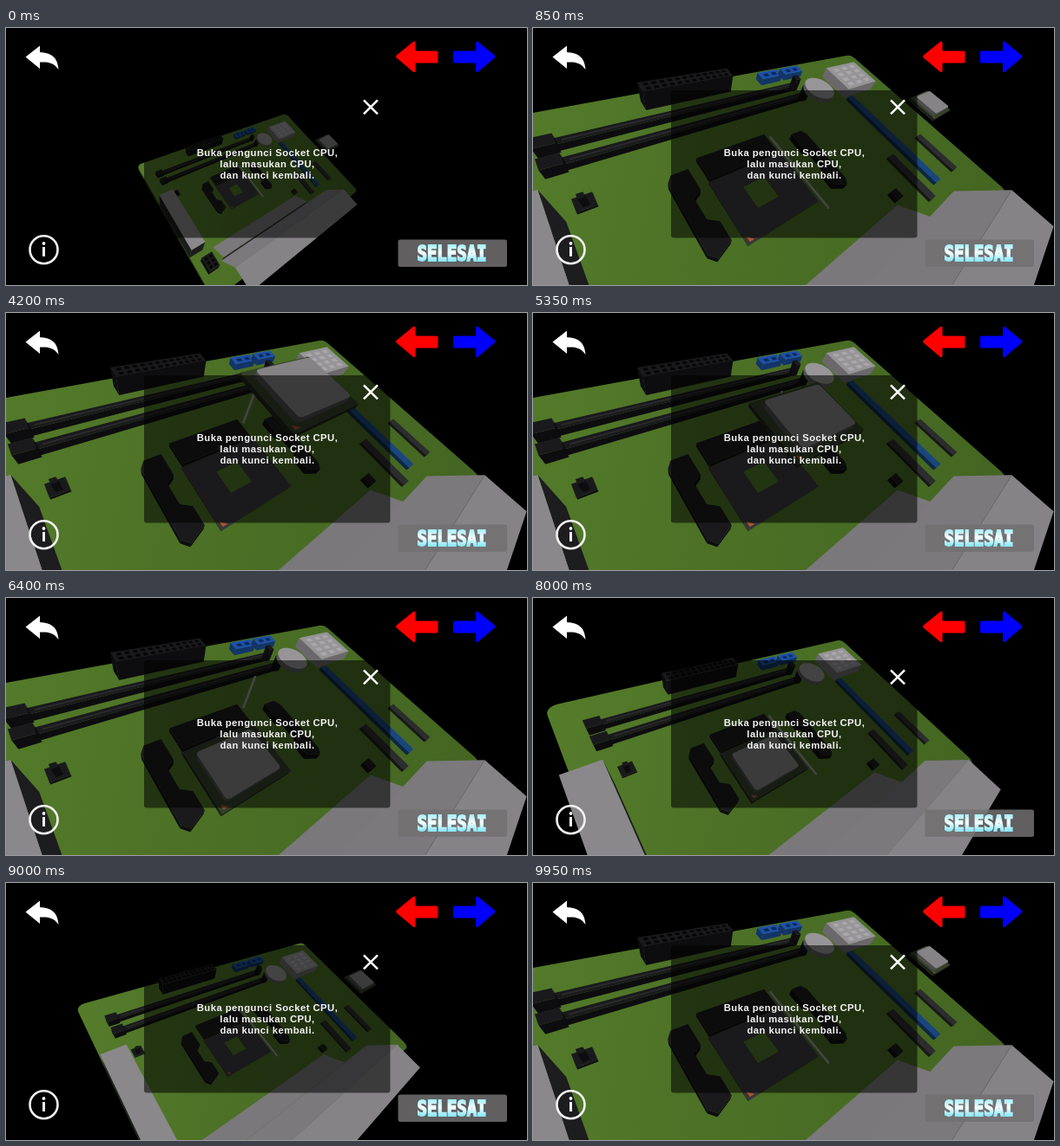
An HTML page with a canvas that plays this animation: 600x297 px, repeating every 10 s.

```html
<!DOCTYPE html>
<html lang="id">
<head>
<meta charset="utf-8">
<title>Socket CPU</title>
<style>
html, body { margin: 0; width: 100%; height: 100%; overflow: hidden; background: #000; }
canvas { display: block; width: 600px; height: 297px; }
</style>
</head>
<body>
<canvas id="stage" width="600" height="297"></canvas>
<script>
const ctx = document.getElementById('stage').getContext('2d');
const LOOP = 10000;

// Board space: u along the far edge, v towards the viewer, z up (homogeneous columns).
const ORIGIN = [-27, 49, 0.45];
const U = [411.3, -16.5, 0.6];
const V = [53.3, 119.5, -0.25];
const Z = [-135, -287, -0.745];
const FOCUS = [266, 186, 1];
let dolly = 0;

const BLACK = ['#1a1a1c', '#0d0d0f'];
const GREY = ['#8a888b', '#1d1c1e'];
const BLUE = ['#1d51a8', '#123469'];

function project([u, v, z = 0]) {
  const [x, y, w] = ORIGIN.map((o, i) => o + u * U[i] + v * V[i] + z * Z[i] + dolly * FOCUS[i]);
  return [x / w, y / w];
}

function trace(points) {
  ctx.beginPath();
  points.forEach(([x, y], i) => i ? ctx.lineTo(x, y) : ctx.moveTo(x, y));
}

function fill(points, color) {
  trace(points);
  ctx.closePath();
  ctx.fillStyle = color;
  ctx.fill();
}

// Draws a face only when it turns clockwise on screen.
function face(corners, color) {
  const p = corners.map(project);
  const area = p.reduce((sum, [x, y], i) => {
    const [nx, ny] = p[(i + 1) % p.length];
    return sum + x * ny - nx * y;
  }, 0);
  if (area > 0) fill(p, color);
}

function slab(outline, bottom, top, [topColor, sideColor]) {
  outline.forEach(([u, v], i) => {
    const [nu, nv] = outline[(i + 1) % outline.length];
    face([[nu, nv, top], [u, v, top], [u, v, bottom], [nu, nv, bottom]], sideColor);
  });
  face(outline.map(([u, v]) => [u, v, top]), topColor);
}

const rect = (u0, v0, u1, v1) => [[u0, v0], [u1, v0], [u1, v1], [u0, v1]];
const box = (u0, v0, u1, v1, h, colors, z = 0) => slab(rect(u0, v0, u1, v1), z, z + h, colors);

function oval(cu, cv, ru, rv, from, to, steps) {
  return Array.from({ length: steps }, (_, i) => {
    const a = from + (to - from) * i / steps;
    return [cu + ru * Math.cos(a), cv + rv * Math.sin(a)];
  });
}

function roundedRect(u0, v0, u1, v1, ru, rv) {
  const q = Math.PI / 2;
  return [[u0 + ru, v0 + rv], [u1 - ru, v0 + rv], [u1 - ru, v1 - rv], [u0 + ru, v1 - rv]]
    .flatMap(([u, v], k) => oval(u, v, ru, rv, (k + 2) * q, (k + 3.2) * q, 6));
}

function pins(u0, v0, u1, v1, z, cols, rows, color = '#060607') {
  const du = (u1 - u0) / cols, dv = (v1 - v0) / rows;
  for (let i = 0; i < cols; i++)
    for (let j = 0; j < rows; j++) {
      const u = u0 + du * i, v = v0 + dv * j;
      face(rect(u + du * .22, v + dv * .2, u + du * .78, v + dv * .8).map(p => [...p, z]), color);
    }
}

function board() {
  const light = ctx.createLinearGradient(...project([0, 0]), ...project([1, 1]));
  light.addColorStop(0, '#557c2b');
  light.addColorStop(1, '#436521');
  slab(roundedRect(0, 0, 1, 1, .022, .035), -.014, 0, [light, '#2c4417']);
}

function ramSlot(v) {
  box(.08, v, .625, v + .022, .018, BLACK);
  face(rect(.09, v + .009, .61, v + .014).map(p => [...p, .018]), '#2c2c2f');
  box(.052, v - .006, .082, v + .028, .026, BLACK);
  box(.614, v - .003, .628, v + .025, .042, BLACK);
}

function bracket(outer, inner, v) {
  const mid = outer + (inner - outer) * .6;
  const end = outer + (inner - outer) * .25;
  const outline = [[outer, v + .02], [end, v], [inner, v], [inner, v + .07], [mid, v + .085], [mid, v + .15],
    [inner, v + .17], [inner, v + .225], [end, v + .245], [outer, v + .225]];
  slab(inner > outer ? outline : outline.reverse(), 0, .02, BLACK);
}

function socket() {
  box(.265, .395, .437, .597, .004, ['#39373b', '#222']);
  face(rect(.318, .45, .368, .525).map(p => [...p, .004]), '#4f7429');
  face([[.27, .575, .005], [.28, .592, .005], [.27, .592, .005]], '#a4572c');
  box(.268, .315, .43, .392, .012, ['#1b1a1d', '#111']);
}

function lever(open) {
  const angle = open * Math.PI / 2, len = .3 - .155 * open;
  const base = project([.443, .33, .006]);
  const tip = project([.445, .33 + len * Math.cos(angle), .006 + len * .69 * Math.sin(angle)]);
  trace([base, tip]);
  ctx.strokeStyle = '#96969a';
  ctx.lineWidth = 2.6 / (1 + dolly);
  ctx.lineCap = 'round';
  ctx.stroke();
}

function cpu([u, v, z, s]) {
  const a = .08 * s, b = .095 * s;
  box(u - a, v - b, u + a, v + b, .01, ['#35412a', '#1d2419'], z);
  const c = a * .8, e = b * .8;
  slab(roundedRect(u - c, v - e, u + c, v + e, c * .12, e * .12), z + .01, z + .022, ['#858386', '#4c4b4e']);
  face([[u - a * .92, v + b * .78, z + .01], [u - a * .78, v + b * .92, z + .01], [u - a * .92, v + b * .92, z + .01]], '#a4572c');
}

// Heat sink running along u: a slope from v0 up to v1, then flat until v2.
function ridgeSink(a, b, v0, v1, v2, h, slope, top) {
  const dark = '#242326';
  face([[a, v2, 0], [a, v2, h], [a, v1, h], [a, v0, 0]], dark);
  face([[a, v2, h], [b, v2, h], [b, v2, 0], [a, v2, 0]], dark);
  face([[a, v0, 0], [b, v0, 0], [b, v1, h], [a, v1, h]], slope);
  face([[a, v1, h], [b, v1, h], [b, v2, h], [a, v2, h]], top);
}

function scene(state) {
  board();
  box(.237, .035, .44, .078, .052, BLACK);
  pins(.242, .037, .435, .076, .052, 12, 2);
  for (const u of [.536, .616]) {
    box(u, .04, u + .068, .08, .022, BLUE);
    pins(u + .007, .047, u + .061, .075, .022, 2, 1, '#0d2a5c');
  }
  box(.765, .11, .91, .265, .035, ['#969497', '#6a686b']);
  pins(.775, .12, .9, .255, .035, 3, 4, '#a9a7aa');
  ramSlot(.127);
  ramSlot(.192);
  slab(oval(.693, .192, .046, .068, 0, Math.PI * 2, 32), 0, .016, ['#979598', '#5a595c']);
  box(.073, .3, .1, .338, .006, BLACK);
  box(.082, .312, .091, .326, .028, BLACK);
  socket();
  bracket(.2, .242, .345);
  bracket(.525, .487, .36);
  box(.765, .28, .79, .78, .012, ['#1a4680', '#0d2745']);
  box(.87, .59, .895, .79, .01, ['#2c2d2e', '#181819']);
  box(.7, .6, .725, .81, .01, ['#2c2d2e', '#181819']);
  box(.607, .705, .63, .74, .015, BLACK);
  box(.03, .78, .075, .87, .045, BLACK);
  pins(.032, .785, .073, .865, .045, 2, 3);
  lever(state.open);
  cpu(state.cpu);
  box(0, .345, .058, .73, .1, GREY);
  ridgeSink(.1, .61, .75, .845, .848, .055, '#7a787b', '#7a787b');
  ridgeSink(.1, .81, .845, .938, 1.085, .111, '#7b797c', '#858386');
}

function arrow(dir, x, color) {
  const pts = [[0, 33], [19.5, 17], [19.5, 28], [45.5, 28], [45.5, 39], [19.5, 39], [19.5, 49.5]];
  fill(pts.map(([px, y]) => [x + dir * (px + 1.5), y]), color);
  ctx.strokeStyle = color;
  ctx.lineWidth = 3;
  ctx.lineJoin = 'round';
  ctx.stroke();
}

function backIcon() {
  ctx.fillStyle = '#fff';
  ctx.fill(new Path2D('M22.5 33.5 L39 20.5 V28 C53 28.5 59.5 34.5 60.5 48 C55 40 49 39 39 39.5 V47 Z'));
}

function infoIcon() {
  ctx.strokeStyle = ctx.fillStyle = '#f2f2f2';
  ctx.lineWidth = 2.6;
  ctx.beginPath();
  ctx.arc(43.5, 256.2, 16, 0, Math.PI * 2);
  ctx.stroke();
  ctx.beginPath();
  ctx.arc(43.5, 249, 1.9, 0, Math.PI * 2);
  ctx.fill();
  ctx.fillRect(42, 253, 3, 11);
}

function button() {
  ctx.fillStyle = 'rgba(114,112,113,.85)';
  ctx.beginPath();
  ctx.roundRect(451.5, 244.5, 125.5, 31.5, 2.5);
  ctx.fill();
  ctx.save();
  ctx.translate(513.5, 268.5);
  ctx.scale(1, 1.28);
  ctx.font = 'bold 19px "DejaVu Sans Mono", monospace';
  const shine = ctx.createLinearGradient(0, -14, 0, 0);
  shine.addColorStop(0, '#a8f0fb');
  shine.addColorStop(.5, '#f4ffff');
  shine.addColorStop(1, '#8fe9fa');
  ctx.lineJoin = 'miter';
  ctx.lineWidth = 1.5;
  ctx.strokeStyle = ctx.fillStyle = shine;
  ctx.strokeText('SELESAI', 0, 0);
  ctx.fillText('SELESAI', 0, 0);
  ctx.restore();
}

function overlay() {
  ctx.fillStyle = 'rgba(0,0,0,.55)';
  ctx.beginPath();
  ctx.roundRect(159, 72, 283.5, 170.5, 3);
  ctx.fill();
  ctx.textAlign = 'center';
  ctx.fillStyle = '#f4f4f4';
  ctx.font = 'bold 11.3px "Liberation Sans", Arial, sans-serif';
  ctx.letterSpacing = '0.45px';
  ['Buka pengunci Socket CPU,', 'lalu masukan CPU,', 'dan kunci kembali.']
    .forEach((line, i) => ctx.fillText(line, 301, 148 + 13 * i));
  ctx.letterSpacing = '0px';
  ctx.strokeStyle = '#fff';
  ctx.lineWidth = 2.5;
  ctx.lineCap = 'butt';
  for (const s of [-1, 1]) {
    trace([[420 - 8 * s, 83.3], [420 + 8 * s, 99.3]]);
    ctx.stroke();
  }
  backIcon();
  arrow(1, 449, '#f00');
  arrow(-1, 563.5, '#00f');
  infoIcon();
  button();
}

const REST = [1.095, .485, 0, .85];
const HOVER = [.435, .475, .2, 1];
const SEATED = [.344, .503, .004, 1];
const linear = x => x;
const smooth = x => x * x * (3 - 2 * x);

// Steps are [time, ...values]; equal times make a hard change.
const CAMERA = [[0, .82], [700, 0], [7890, 0], [8590, .82], [9290, 0]];
const LEVER = [[0, 0], [1150, 0], [2180, 1], [6400, 1], [7460, 0]];
const CPU = [
  [0, ...REST], [2250, ...REST], [3200, 1.08, .47, .12, .9], [4150, ...HOVER],
  [4850, ...HOVER], [6300, ...SEATED], [8590, ...SEATED], [8590, ...REST]
];

function sample(steps, t, ease) {
  const i = steps.findIndex(step => step[0] > t);
  if (i < 0) return steps[steps.length - 1].slice(1);
  const [t0, ...a] = steps[i - 1], [t1, ...b] = steps[i];
  const k = ease((t - t0) / (t1 - t0));
  return a.map((x, j) => x + (b[j] - x) * k);
}

function draw(now) {
  const t = now % LOOP;
  dolly = sample(CAMERA, t, linear)[0];
  ctx.fillStyle = '#000';
  ctx.fillRect(0, 0, 600, 297);
  scene({ open: sample(LEVER, t, linear)[0], cpu: sample(CPU, t, smooth) });
  overlay();
}

const start = performance.now();
function tick() {
  draw(performance.now() - start);
  requestAnimationFrame(tick);
}
tick();
</script>
</body>
</html>
```
